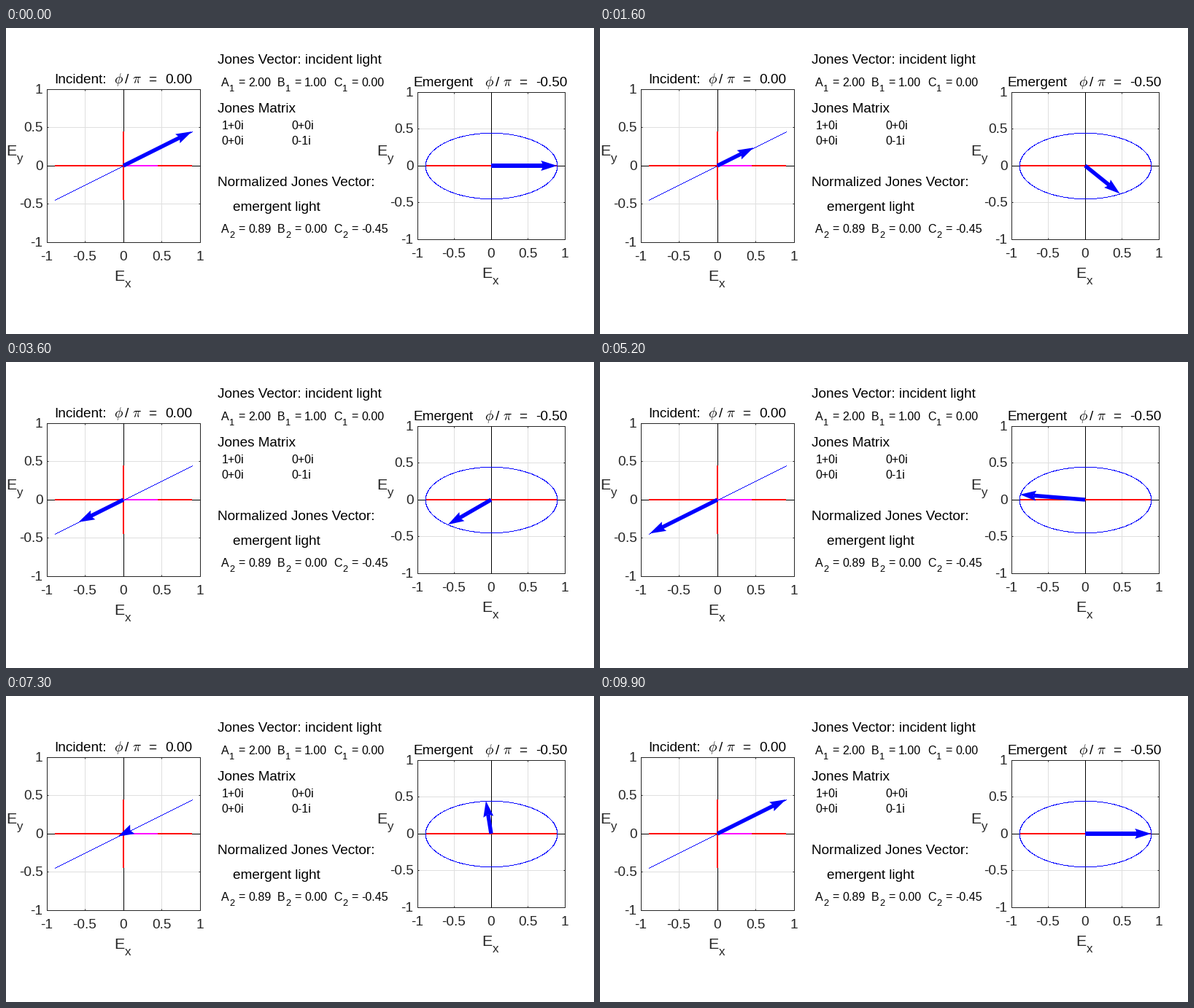
A matplotlib script for the animation above (10 s loop, 806x420 px).

```python
import numpy as np
import matplotlib.pyplot as plt
from matplotlib.animation import FuncAnimation
from matplotlib.collections import PolyCollection
from matplotlib.patches import Polygon

W, H, DPI = 806, 420, 64
FRAMES, INTERVAL = 100, 100
PT = 72 / DPI  # points per pixel
SMALL, BODY, LABEL = 16, 19, 21.33
INK, GRID = "#262626", "#dfdfdf"
HEAD, HALF_HEAD, NOTCH, HALF_SHAFT = 22, 7, 0.15, 2.7

plt.rcParams["font.family"] = "Liberation Sans"
fig = plt.figure(figsize=(W / DPI, H / DPI), dpi=DPI, facecolor="white")
ax = fig.add_axes([0, 0, 1, 1])
ax.set_xlim(0, W)
ax.set_ylim(H, 0)
ax.axis("off")

AMP = np.array([2.0, 1.0]) / np.sqrt(5)


def line(xs, ys, color, width=1, z=2):
    """Crisp straight line; whole numbers name the pixel row or column."""
    ax.plot(xs, ys, color=color, lw=width * PT, snap=True,
            solid_capstyle="butt", solid_joinstyle="miter", zorder=z)


def dots(pts, color, z):
    """Jagged curve made of whole pixels."""
    cells = np.unique(np.floor(pts + 0.5), axis=0)
    square = np.array([[0, 0], [1, 0], [1, 1], [0, 1]])
    ax.add_collection(PolyCollection(cells[:, None] + square, facecolors=color,
                                     linewidths=0, zorder=z), autolim=False)


def text(x, y, s, size=BODY, color="black", ha="left"):
    ax.text(x, y, s, fontsize=size * PT, color=color, ha=ha,
            va="baseline", math_fontfamily="cm", zorder=8)


def sub_label(x, y, sub):
    text(x, y, "E", LABEL, INK)
    text(x + 14.5, y + 9, sub, LABEL * 0.8, INK)


class Panel:
    """Square plot from -1 to 1 with its own rotating field arrow."""

    def __init__(self, cx, cy, half, phase):
        self.mid = np.array([cx, cy])
        self.half = half
        self.phase = np.array([0, phase])
        self.draw_frame()
        self.draw_path()
        style = dict(closed=True, fc="blue", ec="none", zorder=6)
        self.shaft = ax.add_patch(Polygon(np.zeros((4, 2)), **style))
        self.head = ax.add_patch(Polygon(np.zeros((4, 2)), **style))

    def draw_frame(self):
        (cx, cy), r = self.mid, self.half
        left, right, top, bottom = cx - r, cx + r, cy - r, cy + r
        for v in (-1, -0.5, 0, 0.5, 1):
            x, y = np.floor(cx + v * r), np.floor(cy - v * r)
            if abs(v) == 0.5:
                line([x, x], [top, bottom], GRID, z=1)
                line([left, right], [y, y], GRID, z=1)
            for edge, d in ((top, 2), (bottom, -2)):
                line([x, x], [edge, edge + d], INK)
            for edge, d in ((left, 2), (right, -2)):
                line([edge, edge + d], [y, y], INK)
            text(x, bottom + 25, f"{v:g}", BODY, INK, "center")
            text(left - 5.5, y + 6, f"{v:g}", BODY, INK, "right")
        line([left, right, right, left, left], [top, top, bottom, bottom, top], INK)
        line([cx, cx], [top, bottom], "black")
        line([left, right], [cy, cy], "black")

    def field(self, wt):
        return AMP * np.cos(np.add.outer(wt, self.phase))

    def pixel(self, e):
        return self.mid + self.half * e * [1, -1]

    def draw_path(self):
        cx, cy = self.mid
        rx, ry = self.half * AMP
        line([cx - rx, cx + rx], [cy, cy], "red", 2, 3)
        if self.phase.any():
            wt = np.linspace(0, 2 * np.pi, 900)
        else:
            line([cx, cx], [cy - ry, cy + ry], "red", 2, 3)
            line([cx, cx + ry], [cy, cy], "magenta", 2, 4)
            wt = np.arccos(np.linspace(-1, 1, int(2 * rx) + 1))
        dots(self.pixel(self.field(wt)), "blue", 5)

    def update(self, wt):
        tip = self.pixel(self.field(wt))
        u = (tip - self.mid) / np.hypot(*(tip - self.mid))
        n = np.array([-u[1], u[0]])
        notch = tip - u * HEAD * (1 - NOTCH)
        back = tip - u * HEAD
        side, wing = n * HALF_SHAFT, n * HALF_HEAD
        self.shaft.set_xy([self.mid + side, notch + side, notch - side, self.mid - side])
        self.head.set_xy([tip, back + wing, notch, back - wing])
        return self.shaft, self.head


def title(x, y, name, phi_x, value):
    text(x, y, name)
    parts = ((0, r"$\phi$"), (15, "/"), (25, r"$\pi$"), (47, "="), (70.5, value))
    for dx, s in parts:
        text(phi_x + dx, y, s)


def jones_row(y, index, values):
    for x, name, value in zip((295, 372, 449), "ABC", values):
        shift = name == "C"
        text(x, y, name, SMALL)
        text(x + 11 + shift, y + 7, index, SMALL * 0.8)
        text(x + 23 + shift, y, "=", SMALL)
        text(x + 37 + shift, y, value, SMALL)


panels = [Panel(161, 189, 105, 0), Panel(665, 189, 101, np.pi / 2)]

title(66.5, 76, "Incident:", 148, "0.00")
title(558.5, 80, "Emergent", 656, "-0.50")
sub_label(148, 347, "x")
sub_label(0, 175, "y")
sub_label(652, 343, "x")
sub_label(508, 175, "y")

text(290, 49, "Jones Vector: incident light")
jones_row(80, "1", ("2.00", "1.00", "0.00"))
text(290, 116, "Jones Matrix")
for y, row in ((139, ("1+0i", "0+0i")), (160, ("0+0i", "0-1i"))):
    for x, cell in zip((295.5, 391.5), row):
        text(x, y, cell, SMALL)
text(290, 217, "Normalized Jones Vector:")
text(311, 251, "emergent light")
jones_row(281, "2", ("0.89", "0.00", "-0.45"))


def update(i):
    wt = 2 * np.pi * i / (FRAMES - 1)
    return [patch for p in panels for patch in p.update(wt)]


anim = FuncAnimation(fig, update, frames=FRAMES, interval=INTERVAL,
                     init_func=lambda: update(0), repeat=True, repeat_delay=0)
plt.show()
```
